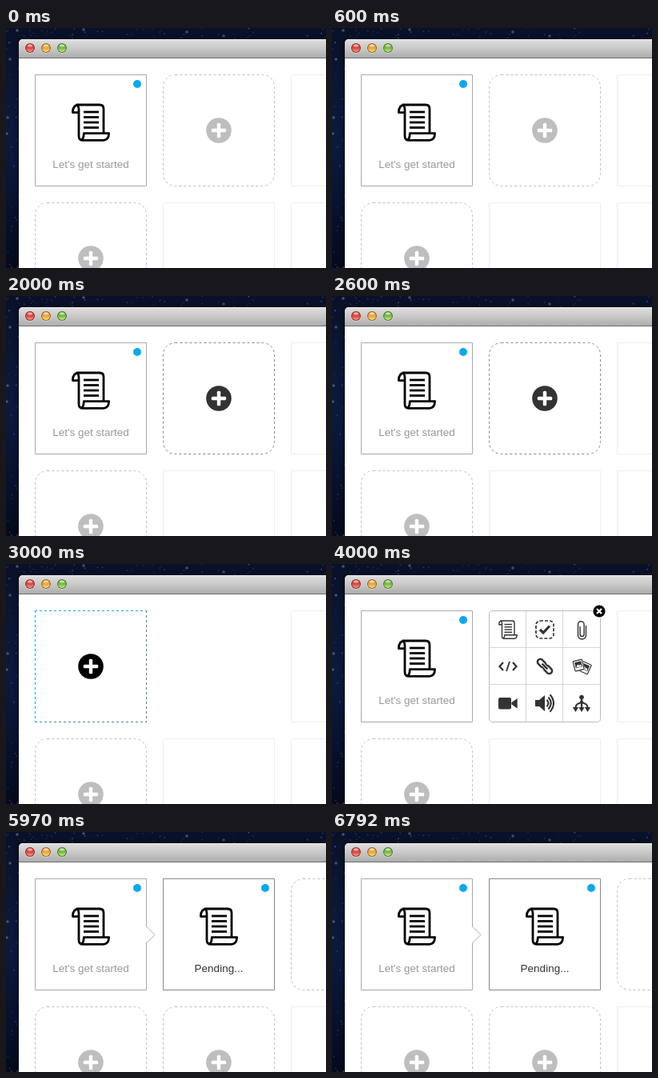
These frames come from a looping animation (400 by 300 pixels, 7.34 s). An HTML page with a canvas:

```html
<!DOCTYPE html>
<html lang="en">
<head>
<meta charset="utf-8">
<title>Card board</title>
<style>
html, body { margin: 0; width: 100%; height: 100%; overflow: hidden; background: #081230; }
canvas { display: block; width: 400px; height: 300px; }
</style>
</head>
<body>
<canvas id="stage" width="400" height="300"></canvas>
<script>
const c = document.getElementById('stage').getContext('2d');
const LOOP = 7340;
const STARTS = [0, 1000, 2000, 3000, 4000, 5000, 5970];
const INK = '#333', GREY = '#bebebe', FAINT = '#eeeeee', BLUE = '#08a8f0';

function stroke(d, color, width = 1, dash = []) {
  c.strokeStyle = color;
  c.lineWidth = width;
  c.setLineDash(dash);
  c.stroke(new Path2D(d));
  c.setLineDash([]);
}

function fill(d, color) {
  c.fillStyle = color;
  c.fill(new Path2D(d));
}

function disc(x, y, r, color) {
  c.fillStyle = color;
  c.beginPath();
  c.arc(x, y, r, 0, Math.PI * 2);
  c.fill();
}

function roundBox(x, y, w, h, r, color) {
  c.fillStyle = color;
  c.beginPath();
  c.roundRect(x, y, w, h, r);
  c.fill();
}

function roundLine(x, y, w, h, r, color, width = 1, dash = []) {
  c.strokeStyle = color;
  c.lineWidth = width;
  c.setLineDash(dash);
  c.beginPath();
  c.roundRect(x, y, w, h, r);
  c.stroke();
  c.setLineDash([]);
}

function at(x, y, draw, scale = 1, angle = 0) {
  c.save();
  c.translate(x, y);
  c.rotate(angle);
  c.scale(scale, scale);
  draw();
  c.restore();
}

function gradient(y0, y1, ...colors) {
  const g = c.createLinearGradient(0, y0, 0, y1);
  colors.forEach((color, i) => g.addColorStop(i / (colors.length - 1), color));
  return g;
}

function sky() {
  c.fillStyle = gradient(0, 300, '#091129', '#0a1737', '#0a1a3e', '#071230', '#040a1d');
  c.fillRect(0, 0, 400, 300);
  let seed = 17;
  const rand = () => (seed = (seed * 16807) % 2147483647) / 2147483647;
  for (let i = 0; i < 90; i++) {
    const top = i < 62;
    const x = rand() * (top ? 400 : 16), y = rand() * (top ? 14 : 300);
    disc(x, y, 0.4 + rand() * 0.6, `rgba(130,155,205,${0.15 + rand() * 0.4})`);
  }
  [[5, 39], [14, 3], [97, 2], [226, 5], [272, 10], [1, 132], [2, 112]]
    .forEach(([x, y]) => disc(x, y, 1.8, 'rgba(120,140,185,.5)'));
}

function light(x, rim, dark, pale) {
  disc(x, 25.7, 6.2, 'rgba(255,255,255,.5)');
  disc(x, 25, 6, rim);
  disc(x, 25, 5, gradient(20, 30, dark, dark, pale));
  c.fillStyle = gradient(20, 25, 'rgba(255,255,255,.85)', 'rgba(255,255,255,.1)');
  c.beginPath();
  c.ellipse(x, 22.2, 3, 1.8, 0, 0, Math.PI * 2);
  c.fill();
}

function windowFrame() {
  c.save();
  c.shadowColor = 'rgba(0,0,0,.6)';
  c.shadowBlur = 10;
  roundBox(16, 14, 400, 300, [5, 0, 0, 0], '#fff');
  c.restore();
  roundBox(16, 14, 400, 24, [5, 0, 0, 0], gradient(14, 37, '#dfdfdf', '#c8c8c8', '#adadad'));
  c.fillStyle = '#ececec';
  c.fillRect(20, 14, 380, 1);
  c.fillStyle = '#6c6c6c';
  c.fillRect(16, 37, 384, 1);
  light(30, '#8d2c29', '#dc453f', '#ff9a8c');
  light(50, '#94601f', '#e5a23a', '#ffe27c');
  light(70, '#47762b', '#76b548', '#c6f28c');
}

const solid = (x, y, color) => roundLine(x + 0.5, y + 0.5, 139, 139, 0, color);
const dashed = (x, y, color) => roundLine(x + 0.5, y + 0.5, 139, 139, 15, color, 1, [3, 3]);

function plus(x, y, color) {
  disc(x, y, 15.8, color);
  roundBox(x - 9.2, y - 2.2, 18.4, 4.4, 1.5, '#fff');
  roundBox(x - 2.2, y - 9.2, 4.4, 18.4, 1.5, '#fff');
}

function slot(x, y, line, icon) {
  dashed(x, y, line);
  plus(x + 70, y + 70, icon);
}

function scroll(color) {
  c.lineJoin = 'round';
  stroke('M-15 -22Q-22.6 -22 -22.6 -12.4H-15.5M-18 -22H11Q16 -22 16 -17V13', color, 2.8);
  stroke('M-18 -22Q-15 -21 -15 -16V17Q-15 22.4 -10 22.4H16Q22.5 22 22.6 13.6H-8.6Q-9 22 -13 22', color, 2.8);
  for (let i = 0; i < 4; i++) stroke(`M-9 ${-13 + i * 6.5}H10`, color, 2.8);
  c.lineJoin = 'miter';
}

function card(x, y, label, line, color) {
  solid(x, y, line);
  disc(x + 128, y + 12, 5, BLUE);
  at(x + 70, y + 60, () => scroll('#000'));
  c.font = '13.5px "Liberation Sans", Arial, sans-serif';
  c.textAlign = 'center';
  c.fillStyle = color;
  c.fillText(label, x + 70, y + 117);
}

// A pointer opens the card edge when it leaves the first card.
function pointer(x, dir, color) {
  fill(`M${x - dir} 118.5L${x + 10 * dir} 128.5L${x - dir} 138.5Z`, '#fff');
  stroke(`M${x} 118.5L${x + 10 * dir} 128.5L${x} 138.5`, color);
}

function dropSlot() {
  const dash = [3, 3];
  stroke('M175.5 58V198', '#52808f', 1, dash);
  stroke('M36 197.5H176', '#3d8fac', 1, dash);
  stroke('M36 58.5H176', '#00aeef', 1, dash);
  stroke('M36.5 58V198', '#00aeef', 1, dash);
  plus(106, 128, '#000');
}

function checkbox() {
  roundLine(-11, -11, 22, 22, 5, INK, 1.7, [4, 2]);
  stroke('M-6 0L-2 4L6 -4.5', INK, 3.2);
}

function clip() {
  c.lineCap = 'round';
  stroke('M-2.4 -4V5.5A2.5 2.5 0 0 0 2.6 5.5V-7A3.8 3.8 0 0 0 -5 -7V6.5A5 5 0 0 0 5 6.5V-5', INK, 1.4);
  c.lineCap = 'butt';
}

function code() {
  stroke('M-6 -5L-10.5 0L-6 5M6 -5L10.5 0L6 5', INK, 2.2);
  stroke('M2 -6L-2 6', INK, 1.9);
}

function link() {
  roundLine(-13, -4, 13.5, 8, 4, INK, 2.8);
  roundLine(-0.5, -4, 13.5, 8, 4, INK, 2.8);
  stroke('M-5.5 0H5.5', '#fff', 4.6);
  stroke('M-5.5 0H5.5', INK, 2.6);
}

function photo(x, y, angle) {
  at(x, y, () => {
    roundBox(-7.2, -7.7, 14.4, 15.4, 1, '#fff');
    roundLine(-6.4, -7, 12.8, 14, 1, INK, 1.3);
    c.fillStyle = INK;
    c.fillRect(-4.6, -5, 9.2, 8);
    fill('M-4 2.4L-1 -1.5L1 0.6L2.4 -1L4 2.4Z', '#fff');
  }, 1, angle);
}

function photos() {
  photo(5, 2, 0.42);
  photo(-4.2, -1.5, -0.24);
}

function camera() {
  roundBox(-12, -7, 16, 14.5, 2, INK);
  fill('M4.5 -1L11.7 -6V6.5L4.5 1.5Z', INK);
}

function speaker() {
  fill('M-12 -4H-7L0 -10V10L-7 4H-12Z', INK);
  stroke('M2.5 -4.2Q6.5 0 2.5 4.2', INK, 2.1);
  stroke('M4.5 -7.5Q11 0 4.5 7.5', INK, 2.1);
  stroke('M6.5 -10.7Q15.5 0 6.5 10.7', INK, 2.1);
}

function branches() {
  disc(0, -8, 2.8, INK);
  stroke('M0 -8V6M0 -5Q0 -1 -4 0Q-7.5 1 -7.5 6M0 -5Q0 -1 4 0Q7.5 1 7.5 6', INK, 2.2);
  for (const x of [-7.5, 0, 7.5]) fill(`M${x - 3.7} 4.5H${x + 3.7}L${x} 10.5Z`, INK);
}

function picker(hover) {
  if (hover) roundBox(197, 59, 45, 45, [3, 0, 0, 0], '#efefef');
  stroke('M242.5 59V197M288.5 59V197M197 104.5H335M197 150.5H335', '#d6d6d6');
  roundLine(196.5, 58.5, 139, 139, 4, '#777', 1, [1, 1]);
  at(220, 82, () => scroll(hover ? '#000' : INK), 0.5);
  at(266, 82, checkbox);
  at(312.5, 82.5, clip);
  at(220, 128, code);
  at(266, 128, link, 0.88, Math.PI / 4);
  at(312, 128, photos, 0.9);
  at(220, 174, camera);
  at(266, 174, speaker);
  at(312, 174.5, branches);
  disc(334, 59, 8.6, '#fff');
  disc(334, 59, 7.6, '#000');
  stroke('M331 56L337 62M337 56L331 62', '#fff', 2.4);
}

function draw(step) {
  const done = step === 6;
  sky();
  windowFrame();
  if (done) {
    dashed(356, 58, GREY);
    slot(196, 218, GREY, GREY);
  } else {
    solid(356, 58, FAINT);
    solid(196, 218, FAINT);
  }
  solid(356, 218, FAINT);
  slot(36, 218, GREY, GREY);

  if (step === 3) dropSlot();
  else card(36, 58, "Let's get started", '#aaa', '#999');

  if (step === 0) slot(196, 58, GREY, GREY);
  if (step === 1) {
    slot(196, 58, FAINT, INK);
    pointer(196, -1, '#bbb');
  }
  if (step === 2) slot(196, 58, '#888', INK);
  if (step === 4 || step === 5) picker(step === 5);
  if (done) {
    card(196, 58, 'Pending...', '#888', '#333');
    pointer(176, 1, '#aaa');
  }
}

let shown = -1;
const begin = performance.now();
function tick() {
  const t = (performance.now() - begin) % LOOP;
  const step = STARTS.filter(s => s <= t).length - 1;
  if (step !== shown) draw(shown = step);
  requestAnimationFrame(tick);
}
tick();
</script>
</body>
</html>
```
